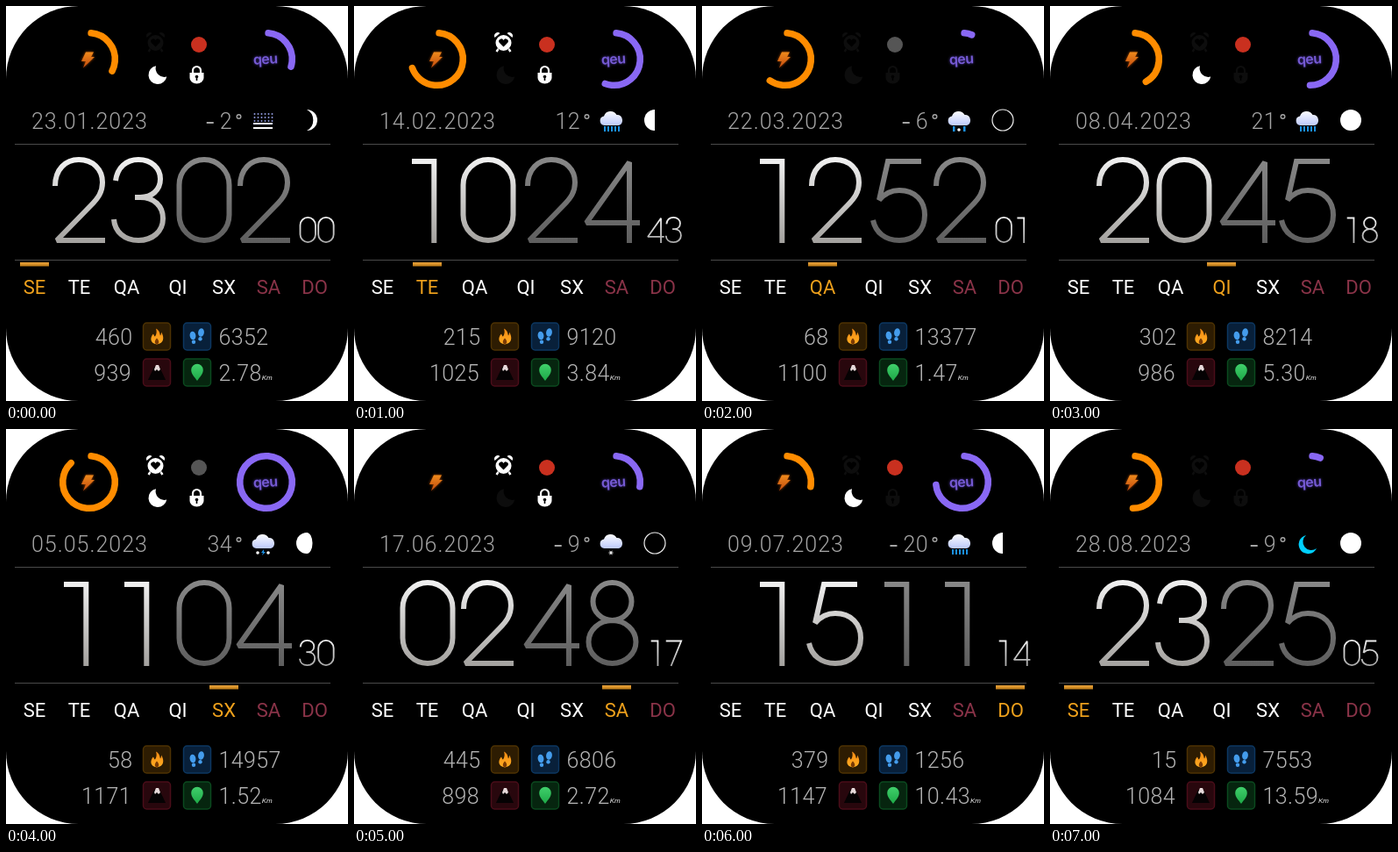
An HTML page with a canvas that plays this animation: 390 px wide and 450 px high, repeating every 8 s.

```html
<!DOCTYPE html>
<html lang="pt">
<head>
<meta charset="utf-8">
<title>Watch face</title>
<style>
html, body { margin: 0; width: 100%; height: 100%; overflow: hidden; background: #fff; }
canvas { display: block; width: 390px; height: 450px; }
</style>
</head>
<body>
<canvas id="stage" width="390" height="450"></canvas>
<script>
const ctx = document.getElementById('stage').getContext('2d');
const STEP = 1000;
const OFF = '#0d0d0d';
const THIN = '300 25px Roboto, sans-serif';
const DAYS = [['SE', 32.5], ['TE', 83.5], ['QA', 137.5], ['QI', 196], ['SX', 248.5], ['SA', 299.5], ['DO', 352]];

// Thin geometric digits on a 70 x 98 cell
const DIGITS = {
  0: 'M6.5 32A28.5 29 0 0 1 63.5 32V66A28.5 29 0 0 1 6.5 66Z',
  1: 'M17 5H42.3V98',
  2: 'M7 33C7 14 19 3 34 3C50 3 61 14 61 29C61 40 56 47 48 55L9 95H64',
  3: 'M7 27C9 12 19 3 33 3C48 3 58 13 58 25C58 38 48 46 35 46H29M35 46C51 46 61 56 61 70C61 85 49 95 33 95C17 95 6 85 5 71',
  4: 'M54 98V6L5 75H66',
  5: 'M59 5H21L11 49C17 42 25 38 34 38C52 38 63 50 63 66C63 84 51 95 34 95C18 95 7 86 4 72',
  7: 'M5 5H62L24 98',
  8: 'M34.5 3A22 21.5 0 0 1 34.5 46A22 21.5 0 0 1 34.5 3ZM34.5 46A27 24.5 0 0 1 34.5 95A27 24.5 0 0 1 34.5 46Z'
};

// ring and goal are end angles in degrees; status = alarm, moon, lock, link
const STATES = [
  { date: '23.01.2023', time: '2302', sec: '00', temp: -2, sky: 'fog', phase: 'crescent', ring: 117, goal: 107, status: [0, 1, 1, 1], stats: ['460', '6352', '939', '2.78'] },
  { date: '14.02.2023', time: '1024', sec: '43', temp: 12, sky: 'rain', phase: 'half', ring: 250, goal: 200, status: [1, 0, 1, 1], stats: ['215', '9120', '1025', '3.84'] },
  { date: '22.03.2023', time: '1252', sec: '01', temp: -6, sky: 'sleet', phase: 'new', ring: 215, goal: 22, status: [0, 0, 0, 0], stats: ['68', '13377', '1100', '1.47'] },
  { date: '08.04.2023', time: '2045', sec: '18', temp: 21, sky: 'rain', phase: 'full', ring: 150, goal: 180, status: [0, 1, 0, 1], stats: ['302', '8214', '986', '5.30'] },
  { date: '05.05.2023', time: '1104', sec: '30', temp: 34, sky: 'storm', phase: 'gibbous', ring: 317, goal: 365, status: [1, 1, 1, 0], stats: ['58', '14957', '1171', '1.52'] },
  { date: '17.06.2023', time: '0248', sec: '17', temp: -9, sky: 'snow', phase: 'new', ring: 0, goal: 100, status: [1, 0, 1, 1], stats: ['445', '6806', '898', '2.72'] },
  { date: '09.07.2023', time: '1511', sec: '14', temp: -20, sky: 'rain', phase: 'half', ring: 100, goal: 264, status: [0, 1, 0, 1], stats: ['379', '1256', '1147', '10.43'] },
  { date: '28.08.2023', time: '2325', sec: '05', temp: -9, sky: 'night', phase: 'full', ring: 180, goal: 23, status: [0, 0, 0, 1], stats: ['15', '7553', '1084', '13.59'] }
];

function vertical(top, bottom, from, to) {
  const g = ctx.createLinearGradient(0, top, 0, bottom);
  g.addColorStop(0, from);
  g.addColorStop(1, to);
  return g;
}

function shape(path, color, x = 0, y = 0, line = 0) {
  ctx.save();
  ctx.translate(x, y);
  const p = new Path2D(path);
  if (line) {
    ctx.strokeStyle = color;
    ctx.lineWidth = line;
    ctx.stroke(p);
  } else {
    ctx.fillStyle = color;
    ctx.fill(p);
  }
  ctx.restore();
}

function disc(x, y, r, color) {
  ctx.fillStyle = color;
  ctx.beginPath();
  ctx.arc(x, y, r, 0, Math.PI * 2);
  ctx.fill();
}

function box(x, y, w, h, color) {
  ctx.fillStyle = color;
  ctx.fillRect(x, y, w, h);
}

function text(str, x, y, font, color, align = 'left', spacing = 0) {
  ctx.font = font;
  ctx.letterSpacing = spacing + 'px';
  ctx.fillStyle = color;
  ctx.textAlign = align;
  ctx.fillText(str, x, y);
  const width = ctx.measureText(str).width;
  ctx.letterSpacing = '0px';
  return width;
}

function digit(d, x, y, scale, from, to) {
  ctx.save();
  ctx.translate(x, y);
  ctx.scale(scale, scale);
  ctx.miterLimit = 2;
  shape(DIGITS[d], vertical(0, 98, from, to), 0, 0, 6);
  ctx.restore();
}

function ring(x, end, color) {
  if (!end) return;
  const rad = deg => (deg - 90) * Math.PI / 180;
  ctx.strokeStyle = color;
  ctx.lineWidth = 7.6;
  ctx.lineCap = 'round';
  ctx.beginPath();
  ctx.arc(x, 60.5, 29.8, rad(5), rad(end));
  ctx.stroke();
  ctx.lineCap = 'butt';
}

function statusIcons([alarm, moon, lock, link]) {
  const tone = on => on ? '#fff' : OFF;
  const hole = '#000';

  disc(170.5, 42, 9, tone(alarm));
  shape('M-10 -5A4 4 0 0 1 -4 -10ZM10 -5A4 4 0 0 0 4 -10Z', tone(alarm), 170.5, 41);
  shape('M-6 7L-8 10M6 7L8 10', tone(alarm), 170.5, 42, 2.4);
  shape('M0 4.5L-5 -0.5A2.7 2.7 0 0 1 0 -3A2.7 2.7 0 0 1 5 -0.5Z', hole, 170.5, 42);

  disc(220, 44, 9, link ? '#c9301f' : '#555');

  shape('M-2 -10.3A10.5 10.5 0 1 0 10.3 2A10 10 0 0 1 -2 -10.3Z', tone(moon), 173, 78.5);

  shape('M-4.5 -1V-4.5A4.5 4.5 0 0 1 4.5 -4.5V-1', tone(lock), 217.5, 78, 2.2);
  shape('M-8 -2H8V4A8 6.5 0 0 1 -8 4Z', tone(lock), 217.5, 78);
  disc(217.5, 80.5, 1.8, hole);
  box(216.7, 80, 1.6, 5, hole);
}

function cloud() {
  shape('M-8 5A5.3 5.3 0 0 1 -8.5 -5.5A8 8 0 0 1 6 -7A6.2 6.2 0 0 1 8.5 5Z',
    vertical(-12, 6, '#fff', '#b9c6fa'), 293.5, 131);
}

function weather(sky) {
  const blue = '#1a8fe3';
  if (sky === 'night') {
    shape('M-1 -11A10.7 10.7 0 1 0 11 4A9 9 0 0 1 -1 -11Z', '#00d0ff', 293, 132);
    return;
  }
  if (sky === 'fog') {
    for (let row = 0; row < 3; row++)
      for (let i = 0; i < 6; i++) disc(283.5 + i * 4, 123 + row * 4, 1, '#8d96d8');
    box(282, 133, 22, 2, '#dfe3ff');
    box(282, 138, 22, 2, '#fff');
    return;
  }
  cloud();
  if (sky === 'rain') {
    for (let i = 0; i < 5; i++) box(285 + i * 4, 137, 2, 6, blue);
  } else if (sky === 'sleet') {
    box(286, 137, 2.5, 6, blue);
    box(298, 137, 2.5, 6, blue);
    disc(293, 141, 1.8, '#fff');
  } else if (sky === 'storm') {
    shape('M1 0L-2 4H0L-1 7L3 3H1Z', blue, 293, 137);
    disc(287, 141, 1.8, '#fff');
    disc(299, 141, 1.8, '#fff');
  } else {
    shape('M-2.5 0H2.5M-1.3 -2.2L1.3 2.2M1.3 -2.2L-1.3 2.2', '#fff', 293, 141, 1);
  }
}

function moonPhase(phase) {
  const paths = {
    crescent: 'M0 -12A12 12 0 0 1 0 12A13.5 13.5 0 0 0 0 -12Z',
    half: 'M0 -12A12 12 0 0 0 0 12Z',
    gibbous: 'M0 -12A12 12 0 0 0 0 12A6.5 12 0 0 0 0 -12Z',
    full: 'M0 -12A12 12 0 0 1 0 12A12 12 0 0 1 0 -12Z'
  };
  if (phase === 'new') shape(paths.full, '#eee', 343, 130, 1.2);
  else shape(paths[phase], '#fff', 343, 130);
}

function tile(x, y, fill, edge) {
  ctx.beginPath();
  ctx.roundRect(x + 1, y + 1, 31, 31, 4);
  ctx.fillStyle = fill;
  ctx.fill();
  ctx.strokeStyle = edge;
  ctx.lineWidth = 1.5;
  ctx.stroke();
}

function statIcons() {
  tile(155.5, 360, '#2d1c02', '#4d3203');
  shape('M-1 -9C4 -6 3 -3 4 -1C5 -2 5 -4 5 -5C9 1 8 8 0 9C-8 8 -8 1 -4 -3C-3 -1 -3 0 -2 0C0 -3 0 -6 -1 -9Z',
    vertical(-9, 9, '#f58a14', '#ffae22'), 172, 376.5);
  shape('M0 2C3 5 3 8 0 9C-3 8 -3 5 0 2Z', '#7a3a04', 172, 376.5);

  tile(201.5, 360, '#08203a', '#0c3761');
  for (const [x, y, lean] of [[213, 375.5, -1], [222.5, 372, 1]]) {
    ctx.fillStyle = '#449cec';
    ctx.beginPath();
    ctx.ellipse(x, y, 3.4, 4.8, lean * 0.15, 0, Math.PI * 2);
    ctx.fill();
    disc(x - lean, y + 7.2, 2.2, '#449cec');
  }

  tile(155.5, 401, '#28070d', '#4a0d19');
  shape('M-10 9L-3 -6H3L10 9Z', '#050203', 172, 417);
  shape('M-3 -3L-1 -8H2L4 -3L2 -1L0 -3L-2 -1Z', '#e6dada', 172, 417);

  tile(201.5, 401, '#06250f', '#0b4a1f');
  shape('M0 9.5C-3 5 -6.8 2 -6.8 -3A6.8 6.8 0 0 1 6.8 -3C6.8 2 3 5 0 9.5Z',
    vertical(-9, 10, '#3fce6a', '#1ca846'), 218, 417.5);
}

function dials(s) {
  ring(94.5, s.ring, '#ff8c00');
  ring(296.5, s.goal, '#8968f4');
  ctx.save();
  ctx.shadowColor = '#b34b00';
  ctx.shadowBlur = 3;
  shape('M-2 -8.5H7L4 -3H8L-5 9.5L-2 2H-7Z', vertical(-9, 10, '#f08c1c', '#c2480f'), 93, 61);
  ctx.restore();
  ctx.save();
  ctx.translate(296, 66);
  ctx.rotate(-0.06);
  ctx.shadowColor = '#4d37a8';
  ctx.shadowBlur = 3;
  text('qeu', 0, 0, '600 16px Inter, sans-serif', '#765bd4', 'center', -0.5);
  ctx.restore();
}

function temperature(value) {
  const tone = '#a4a4a4';
  const width = text(String(Math.abs(value)), 258, 140, THIN, tone, 'right', 0.4);
  if (value < 0) box(258 - width - 15, 132, 8, 2, tone);
  ctx.strokeStyle = tone;
  ctx.lineWidth = 1.4;
  ctx.beginPath();
  ctx.arc(265.5, 126, 2.3, 0, Math.PI * 2);
  ctx.stroke();
}

function weekdays(active) {
  DAYS.forEach(([name, x], i) => {
    const color = i === active ? '#efa11c' : i > 4 ? '#8a3348' : '#fff';
    text(name, x, 327.5, '22px Roboto, sans-serif', color, 'center');
    if (i === active) box(Math.round(x) - 17, 292, 33, 4.5, vertical(292, 297, '#e9a23a', '#b87713'));
  });
}

function stats([energy, steps, pulse, distance]) {
  const tone = '#b4b4b4';
  const spacing = 0.4;
  text(energy, 144.5, 386, THIN, tone, 'right', spacing);
  text(steps, 242.5, 386, THIN, tone, 'left', spacing);
  text(pulse, 143, 426.5, THIN, tone, 'right', spacing);
  const width = text(distance, 242.5, 426.5, THIN, tone, 'left', spacing);
  text('Km', 242.5 + width, 426, 'italic 8px "Liberation Sans", Arial, sans-serif', '#eee');
}

function draw(index) {
  const s = STATES[index];
  box(0, 0, 390, 450, '#fff');
  ctx.fillStyle = '#000';
  ctx.beginPath();
  ctx.roundRect(0, 0, 390, 450, 83);
  ctx.fill();

  dials(s);
  statusIcons(s.status);
  text(s.date, 29, 140, THIN, '#a4a4a4', 'left', 1);
  temperature(s.temp);
  weather(s.sky);
  moonPhase(s.phase);

  box(10, 157, 360, 1, '#4a4a4a');
  box(10, 289, 360, 1, '#4a4a4a');
  [...s.time].forEach((d, i) => {
    const tones = i < 2 ? ['#f2f2f2', '#a3a19e'] : ['#888', '#5e5e5e'];
    digit(d, [49, 118, 191, 260][i], 172, 1, ...tones);
  });
  [...s.sec].forEach((d, i) => digit(d, 333.5 + i * 20.7, 240, 0.306, '#f0f0f0', '#a8a8a8'));

  weekdays(index % 7);
  statIcons();
  stats(s.stats);
}

function tick() {
  draw(Math.floor(performance.now() / STEP) % STATES.length);
  requestAnimationFrame(tick);
}
tick();
</script>
</body>
</html>
```
